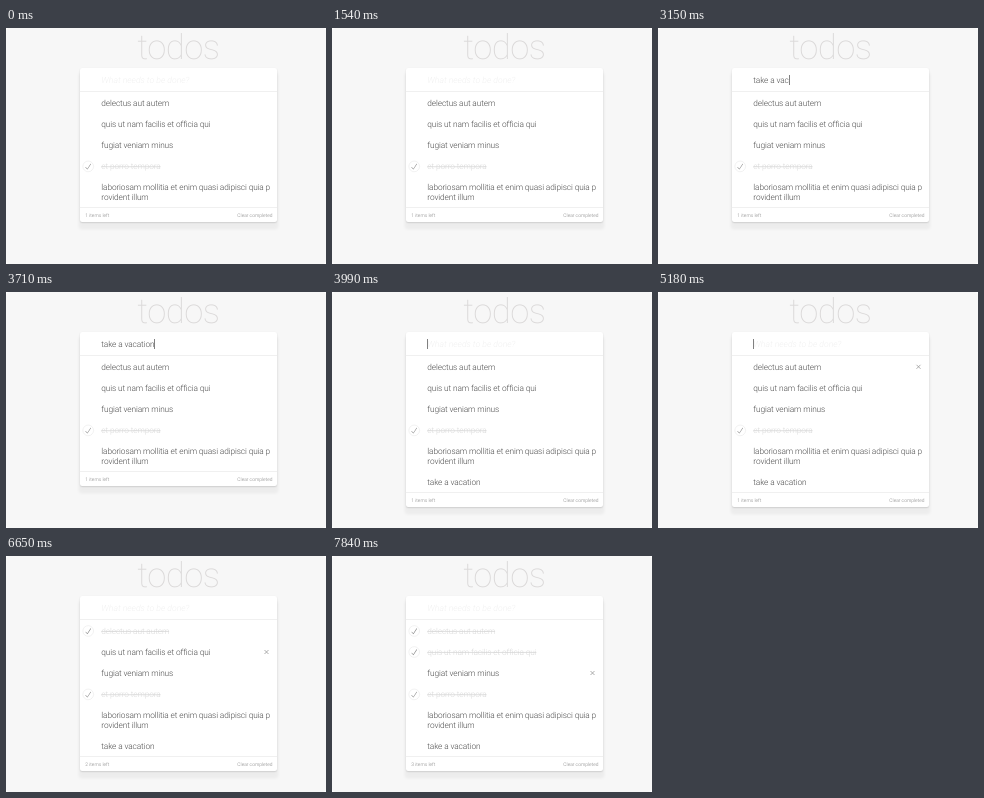
These frames come from a looping animation (320x236 px, 8000 ms). An HTML page:

```html
<!DOCTYPE html>
<html lang="en">
<head>
<meta charset="utf-8">
<title>todos</title>
<style>
  html, body { margin: 0; width: 100%; height: 100%; overflow: hidden; }
  html { background: #fff; }
  body { background: #f7f7f7; border-radius: 4px; }
  #card {
    position: absolute; left: 73.7px; top: 40px; width: 197.4px; height: 154px;
    background: #fff; border-radius: 2px;
    box-shadow: 0 .7px 1.5px rgba(0,0,0,.16), 0 6px 3px 1.5px rgba(0,0,0,.045);
  }
  svg { position: absolute; left: 0; top: 0; }
  text {
    font: 300 8.3px Roboto, "Liberation Sans", sans-serif;
    letter-spacing: -.11px; fill: #4d4d4d; white-space: pre;
    text-rendering: geometricPrecision;
  }
  #title { font-size: 34.6px; font-weight: 100; letter-spacing: -.5px; fill: #dad8d8; text-anchor: middle; }
  #hint { font-size: 8.64px; font-style: italic; letter-spacing: 0; fill: #f0f0f0; }
  #foot text { font-size: 4.9px; letter-spacing: 0; fill: #808080; }
  .done text { text-decoration: line-through; }
  .mark { visibility: hidden; }
  .done .mark { visibility: visible; }
  .mark circle { fill: none; stroke: #e6e6e6; stroke-width: 5; }
  .mark path { fill: #8c8c8c; }
  .line { stroke: #ededed; stroke-width: .8; }
  #cross { stroke: #8c8c8c; stroke-width: .7; }
  #caret { fill: #808080; }
</style>
</head>
<body>
<div id="card"></div>
<svg width="320" height="236" viewBox="0 0 320 236">
  <text id="title" x="172.3" y="31">todos</text>
  <path class="line" d="M73.7 63.5h197.4"/>
  <text id="hint" x="95.3" y="55">What needs to be done?</text>
  <text id="input" x="95.3" y="55"></text>
  <rect id="caret" y="47" width="1" height="10"/>
  <g id="list"></g>
  <path id="cross" d="M-2-2L2 2M2-2L-2 2"/>
  <g id="foot">
    <path class="line" d="M73.7 179.5h197.4"/>
    <text id="count" x="79.3" y="188.6"></text>
    <text x="266.4" y="188.6" text-anchor="end">Clear completed</text>
  </g>
</svg>
<script>
const LOOP = 8000, ADDED = 3990;
const $ = id => document.getElementById(id);

// Row centre, lines of text, times of the fade steps after checking.
const items = [
  { y: 75, lines: ['delectus aut autem'], fade: [6230, 6300, 6370, 6440, 6510] },
  { y: 96, lines: ['quis ut nam facilis et officia qui'], fade: [7140, 7210, 7280, 7350, 7490] },
  { y: 117.2, lines: ['fugiat veniam minus'] },
  { y: 138.4, lines: ['et porro tempora'], fade: [0, 0, 0, 0, 0] },
  { y: 159.3, lines: ['laboriosam mollitia et enim quasi adipisci quia p', 'rovident illum'] },
  { y: 190.2, lines: ['take a vacation'], from: ADDED }
];
const fadeLevels = [0, .3, .65, .9, 1];

const phrase = 'take a vacation';
const keyTimes = [2100, 2170, 2240, 2380, 2450, 2520, 2590, 2870,
                  3010, 3150, 3290, 3430, 3570, 3640, 3710];
const caretSteps = [[0, 0], [1120, 1], [1540, 0], [2100, 1], [4480, 0], [5040, 1], [5530, 0]];
const crossSteps = [[0, null], [5180, 74.8], [6650, 96], [7840, 117]];
const countSteps = [[0, 1], [6230, 2], [7140, 3]];

const stepAt = (steps, t) => steps.filter(s => s[0] <= t).pop()[1];
const passed = (times, t) => times.filter(x => x <= t).length;
const show = (el, on) => el.setAttribute('visibility', on ? 'visible' : 'hidden');

function makeRow({ y, lines }) {
  const row = document.createElementNS('http://www.w3.org/2000/svg', 'g');
  row.innerHTML = `
    <g class="mark" transform="translate(82.2 ${y}) scale(.1067) translate(-50 -50)">
      <circle cx="50" cy="50" r="50"/>
      <path d="M72 25L42 71 27 56l-4 4 20 20 34-52z"/>
    </g>` + lines.map((s, i) => `<text x="95.3" y="${y + 2.7 + i * 10.2}">${s}</text>`).join('');
  return $('list').appendChild(row);
}
for (const item of items) item.row = makeRow(item);

function drawRow({ row, fade = [], from = 0 }, t) {
  const n = passed(fade, t);
  const shade = Math.round(77 + 140 * (n ? fadeLevels[n - 1] : 0));
  row.setAttribute('class', n ? 'done' : '');
  row.style.display = t < from ? 'none' : '';
  for (const el of row.querySelectorAll('text')) el.style.fill = `rgb(${shade},${shade},${shade})`;
}

function drawInput(t) {
  const typed = t < ADDED ? phrase.slice(0, passed(keyTimes, t)) : '';
  $('input').textContent = typed;
  show($('hint'), !typed);
  show($('caret'), stepAt(caretSteps, t));
  const width = typed ? $('input').getComputedTextLength() : 0;
  $('caret').setAttribute('x', Math.round(95.3 + width));
}

function render(t) {
  const grow = t < ADDED ? 0 : 21;
  $('card').style.height = 154 + grow + 'px';
  $('foot').setAttribute('transform', `translate(0 ${grow})`);
  $('count').textContent = stepAt(countSteps, t) + ' items left';
  items.forEach(item => drawRow(item, t));
  drawInput(t);
  const crossY = stepAt(crossSteps, t);
  show($('cross'), crossY);
  $('cross').setAttribute('transform', `translate(260.5 ${crossY || 0})`);
}

const start = performance.now();
function tick() {
  render((performance.now() - start) % LOOP);
  requestAnimationFrame(tick);
}
tick();
</script>
</body>
</html>
```
